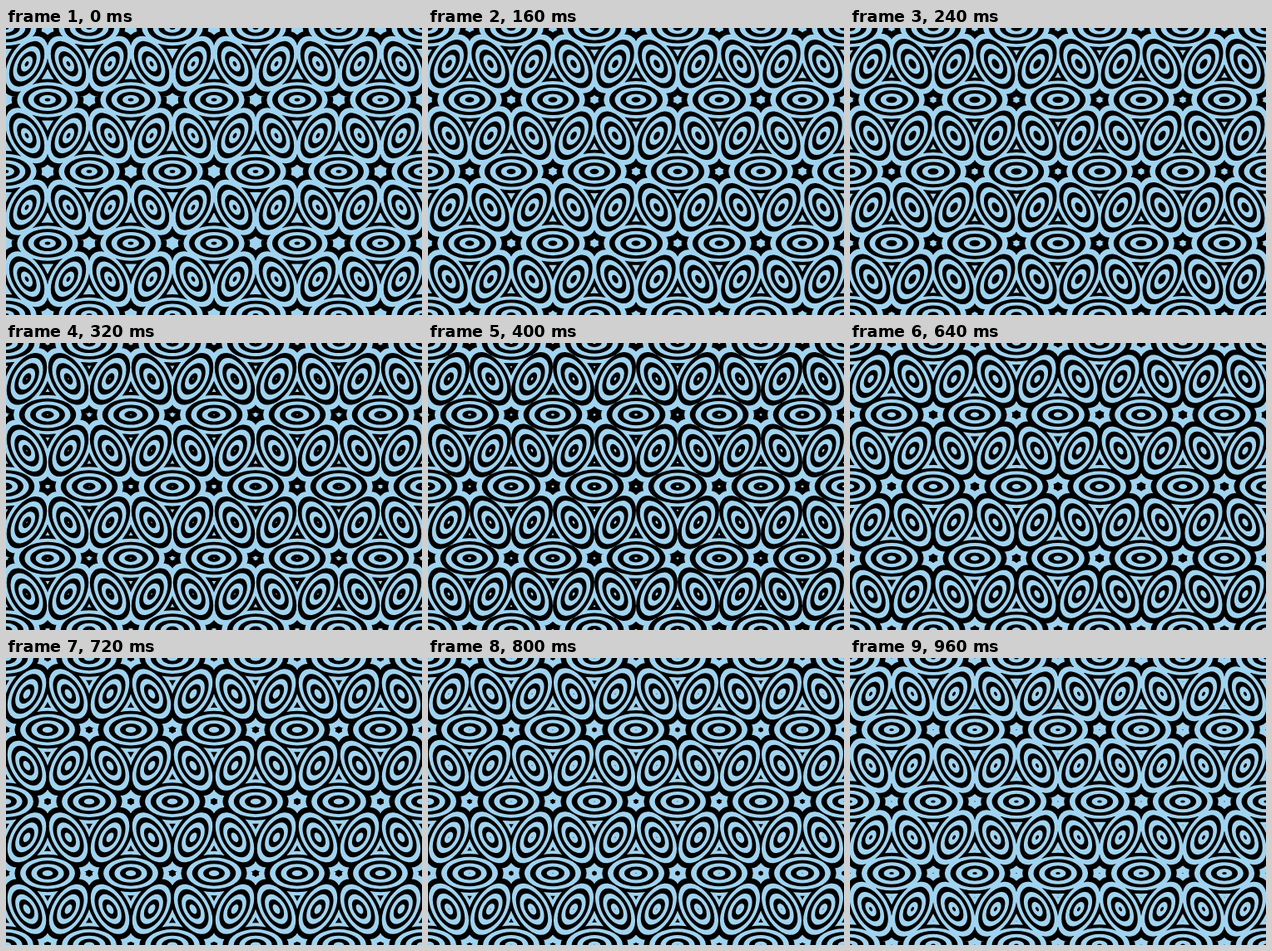
Animation of 500x346 px, one loop 1000 ms. Source, as an HTML page with a canvas:

```html
<!DOCTYPE html>
<html lang="en">
<head>
<meta charset="utf-8">
<title>Pulsing ellipses</title>
<style>
  html, body { margin: 0; width: 100%; height: 100%; overflow: hidden; background: #000; }
  canvas { display: block; }
</style>
</head>
<body>
<canvas width="500" height="346"></canvas>
<script>
const ctx = document.querySelector('canvas').getContext('2d');
const LOOP = 1000, STEP = 40;
const SIDE = 100, ROW = 86.5;   // triangular lattice
const BAND = 50 / 7.5;          // width of one colour band along the long axis
const COLORS = ['#a0d3ef', '#000'];

// One ellipse sits on the middle of every lattice edge.
const ellipses = [];
for (let row = -1; row <= 5; row++) {
  for (let col = -1; col <= 6; col++) {
    const x = col * SIDE + (row % 2 ? 0 : SIDE / 2), y = row * ROW;
    ellipses.push([x + SIDE / 2, y, 0]);
    ellipses.push([x + SIDE / 4, y + ROW / 2, Math.PI / 3]);
    ellipses.push([x - SIDE / 4, y + ROW / 2, -Math.PI / 3]);
  }
}

function fillAll(r, color) {
  ctx.beginPath();
  for (const [x, y, angle] of ellipses) {
    ctx.moveTo(x + r * Math.cos(angle), y + r * Math.sin(angle));
    ctx.ellipse(x, y, r, r / Math.sqrt(3), angle, 0, 2 * Math.PI);
  }
  ctx.fillStyle = color;
  ctx.fill();
}

function draw(now) {
  const t = Math.floor(now % LOOP / STEP) * STEP / LOOP;
  const shift = 2 * t - 0.5;
  // Paint the union of all ellipses from the widest band inwards.
  for (let i = 9; i >= -1; i--) {
    const r = BAND * (shift + i);
    if (r > 0) fillAll(r, COLORS[Math.abs(i % 2)]);
  }
}

const start = performance.now();
function tick() {
  draw(performance.now() - start);
  requestAnimationFrame(tick);
}
tick();
</script>
</body>
</html>
```
